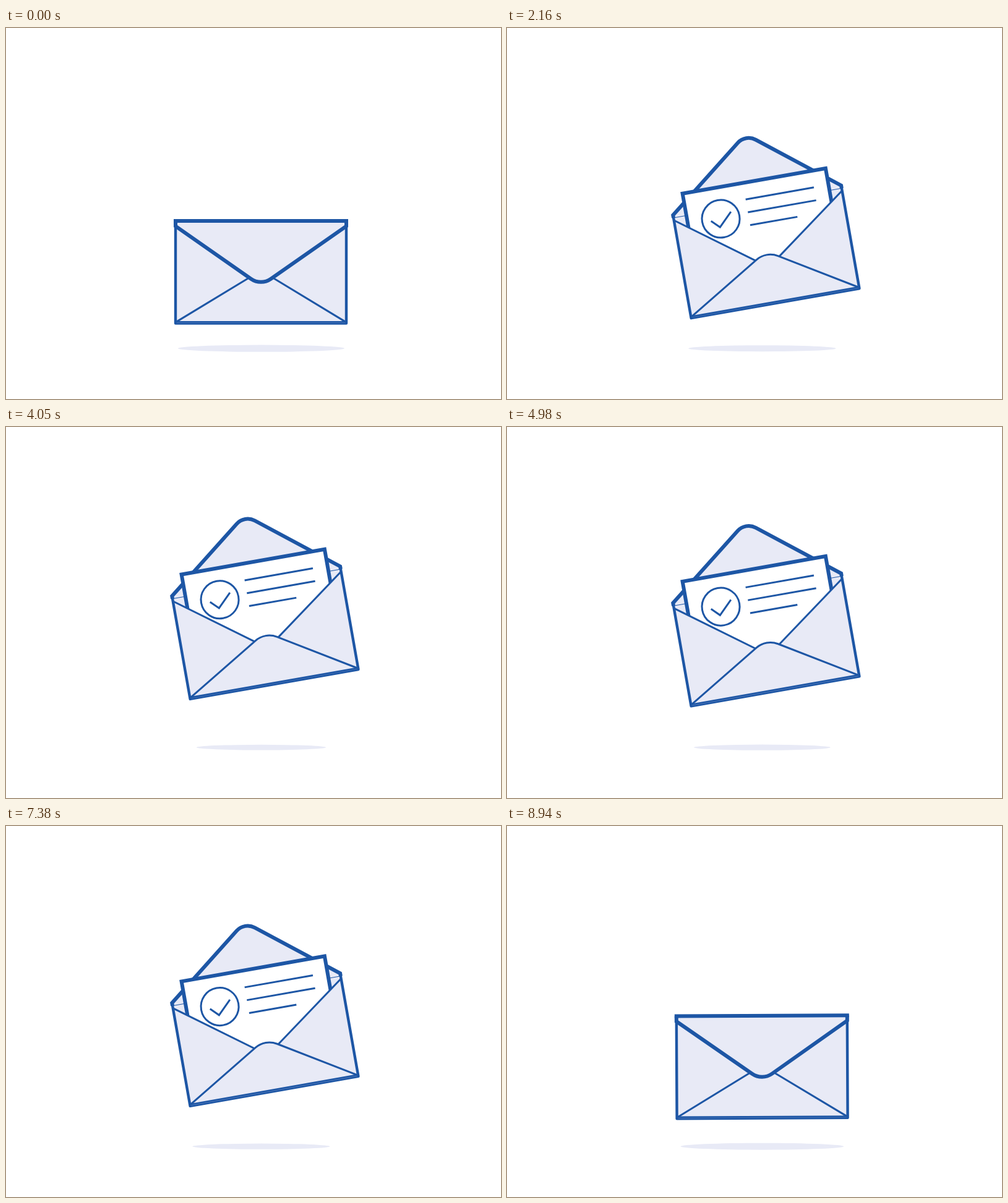
An HTML page with a canvas that plays this animation: 800 by 600 pixels, repeating every 8.97 s.

```html
<!DOCTYPE html>
<html lang="en">
<head>
<meta charset="utf-8">
<title>Envelope</title>
<style>
  html, body { margin: 0; width: 100%; height: 100%; overflow: hidden; background: #fff; }
  canvas { display: block; width: 800px; height: 600px; }
</style>
</head>
<body>
<canvas id="stage"></canvas>
<script>
const LOOP = 8970, STEP = 30;
const INK = '#1d56a5', PALE = '#e8eaf6';
const LEFT = 274, RIGHT = 550, MID = 412, BOTTOM = 477.6;
const TURNS = [1200, 2240, 4150, 6110, 8450]; // highest and lowest points of the float, in turn

const canvas = document.getElementById('stage');
const ctx = canvas.getContext('2d');
const ratio = window.devicePixelRatio || 1;
canvas.width = 800 * ratio;
canvas.height = 600 * ratio;

const mix = (a, b, u) => a + (b - a) * u;

function ramp(t, from, to) {
  const u = Math.min(1, Math.max(0, (t - from) / (to - from)));
  return u * u * (3 - 2 * u);
}

// Rises during the first span, falls back during the second
const pulse = (t, a, b, c, d) => ramp(t, a, b) - ramp(t, c, d);

function liftAt(t) {
  let lift = 60 * pulse(t, 0, TURNS[0], TURNS[4], 9047);
  for (let i = 1; i < TURNS.length; i++) {
    lift += (i % 2 ? -30 : 30) * ramp(t, TURNS[i - 1], TURNS[i]);
  }
  return lift;
}

function paint(path, width, fill, join = 'miter') {
  if (fill) { ctx.fillStyle = fill; ctx.fill(path); }
  if (!width) return;
  ctx.strokeStyle = INK;
  ctx.lineWidth = width;
  ctx.lineJoin = join;
  ctx.stroke(path);
}

const shape = (d, ...style) => paint(new Path2D(d), ...style);

// Two slopes that meet on the middle line in a rounded tip
function wedge(base, side, tip, radius, inset = 0) {
  const path = new Path2D();
  path.moveTo(LEFT + inset, base);
  path.lineTo(LEFT + inset, side);
  path.arcTo(MID, tip, RIGHT - inset, side, radius);
  path.lineTo(RIGHT - inset, side);
  path.lineTo(RIGHT - inset, base);
  return path;
}

function drawShadow(lift) {
  const rx = (269 - lift) / 2;
  ctx.fillStyle = PALE;
  ctx.beginPath();
  ctx.ellipse(412.4, 518.2, rx, rx / 24, 0, 0, Math.PI * 2);
  ctx.fill();
}

function drawFlap(p) {
  const base = mix(312, 313, p), half = mix(3, 0, p);
  paint(wedge(base, mix(320.5, 308.5, p), mix(417, 200, p), mix(28, 24, p)), 6, PALE);
  shape(`M${LEFT - half} ${base}H${RIGHT + half}`, mix(6, 1, p));
}

function drawLetter(t, sink) {
  ctx.save();
  ctx.beginPath();
  ctx.rect(200, 0, 424, 470);
  ctx.clip();
  ctx.translate(0, sink);
  shape('M295.2 276.8H530V440H295.2Z', 6, '#fff');
  for (let i = 0; i < 3; i++) {
    const start = 602 + 106 * i, length = i < 2 ? 112 : 77.5;
    const shown = length * ramp(t, start, start + 300);
    if (shown) shape(`M394 ${303.9 + 21.1 * i}h${shown}`, 3);
  }
  const drawn = ramp(t, 1150, 1400);
  if (drawn) {
    ctx.setLineDash([48.5 * drawn, 100]);
    shape('M332.9 328.6L345.5 341L367.1 319.4', 3);
  }
  ctx.restore();
}

function drawRing(t, sink) {
  const u = ramp(t, 860, 1200);
  const scale = mix(3.9, 1, u);
  ctx.globalAlpha = u;
  ctx.strokeStyle = INK;
  ctx.lineWidth = 3 * scale;
  ctx.beginPath();
  ctx.arc(349.1, 327.7 + sink, 30.5 * scale, 0, Math.PI * 2);
  ctx.stroke();
  ctx.globalAlpha = 1;
}

function drawFront() {
  shape(`M${LEFT} 317L${MID} 418.4L${RIGHT} 317V${BOTTOM}H${LEFT}Z`, 0, PALE);
  shape(`M${LEFT} 317L${MID} 418.4L${RIGHT} 317`, 3);
  paint(wedge(475.4, 475.4, 392.3, 34, 1), 3, PALE);
  shape('M275 475.4H549', 3);
  shape(`M${LEFT} 311V${BOTTOM}H${RIGHT}V311`, 4.4, null, 'round');
  ctx.fillStyle = '#5c80be';
  ctx.fillRect(LEFT + 2, 476.4, RIGHT - LEFT - 4, 0.7);
}

function drawSparks(t) {
  ctx.globalAlpha = pulse(t, 800, 1040, 1180, 1330);
  for (let i = 0; i < 3; i++) {
    const start = 810 + 30 * ((i + 1) % 3);
    const head = 153 + 107 * ramp(t, start, start + 300);
    const tail = 153 + 107 * ramp(t, start + 150, start + 450);
    if (head - tail < 0.1) continue;
    const angle = (35 * i - 135) * Math.PI / 180;
    const dx = Math.cos(angle), dy = Math.sin(angle);
    shape(`M${415 + dx * tail} ${322 + dy * tail}L${415 + dx * head} ${322 + dy * head}`, 3);
  }
  ctx.globalAlpha = 1;
}

function draw(t) {
  const lift = liftAt(t);
  const tilt = -10 * pulse(t, 0, 1035, 8400, 9000);
  const flap = pulse(t, 40, 480, 8500, 8860);
  const sink = 105 * (1 - pulse(t, 330, 740, 8280, 8620));

  ctx.setTransform(ratio, 0, 0, ratio, 0, 0);
  ctx.fillStyle = '#fff';
  ctx.fillRect(0, 0, 800, 600);
  drawShadow(lift);

  ctx.save();
  ctx.translate(MID, 353.5 - lift);
  ctx.rotate(tilt * Math.PI / 180);
  ctx.translate(-MID, -353.5);
  shape(`M${LEFT} 313H${RIGHT}V${BOTTOM}H${LEFT}Z`, 0, PALE);
  if (flap >= 0.5) drawFlap(flap);
  drawLetter(t, sink);
  drawRing(t, sink);
  drawFront();
  if (flap < 0.5) drawFlap(flap);
  ctx.restore();

  drawSparks(t);
}

function tick() {
  const t = performance.now() % LOOP;
  draw(Math.floor(t / STEP) * STEP);
  requestAnimationFrame(tick);
}
tick();
</script>
</body>
</html>
```
